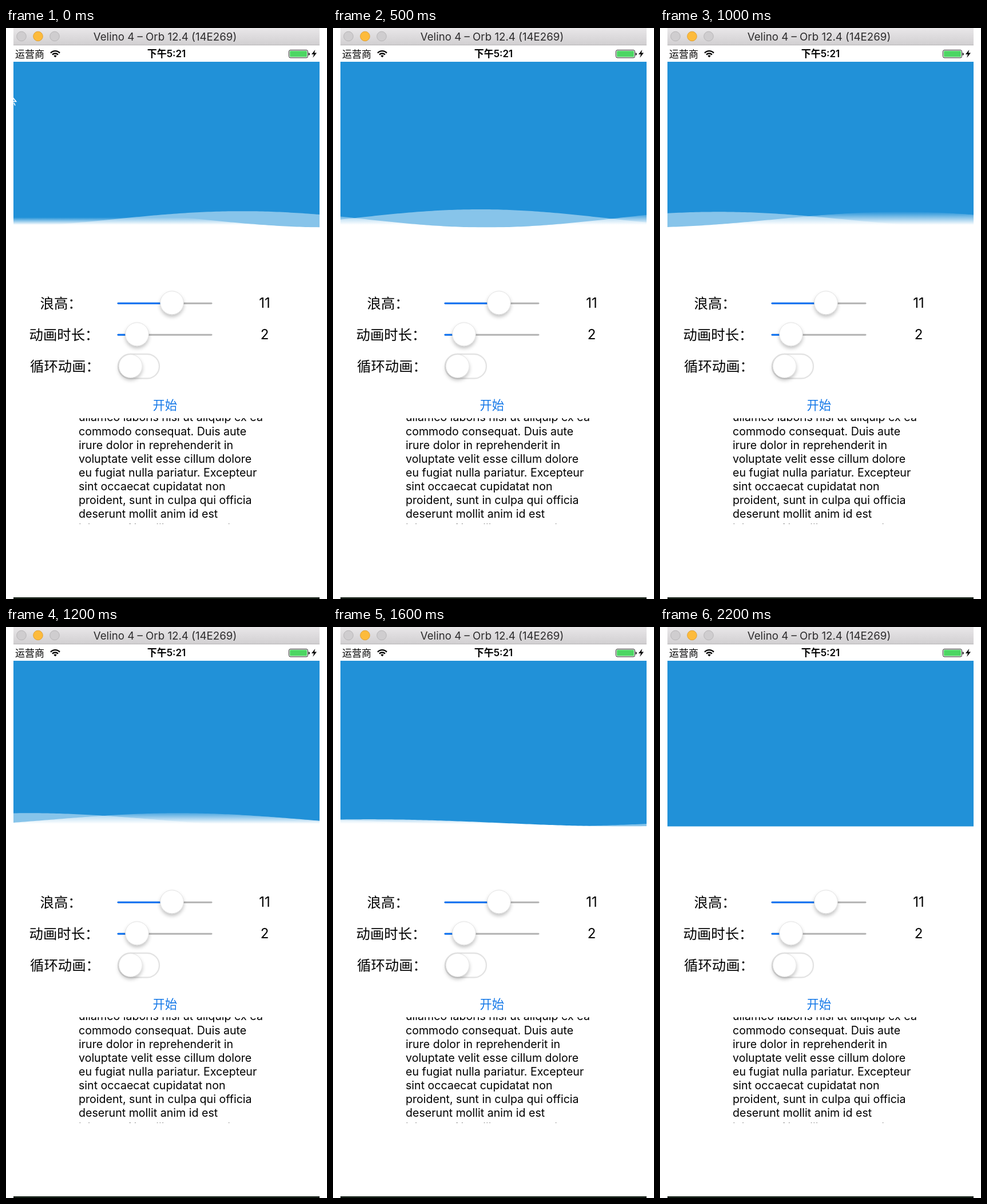
Write an HTML page that moves like this. It is 561 px wide and 998 px high and loops after 2400 ms.

```html
<!DOCTYPE html>
<html lang="zh-CN">
<head>
<meta charset="utf-8">
<title>Wave</title>
<style>
  html, body { margin: 0; width: 100%; height: 100%; overflow: hidden; background: #fff; }
  svg { display: block; width: 561px; height: 998px; }
  text { font-family: Inter, "Noto Sans CJK SC", "Noto Sans CJK", sans-serif; fill: #000; }
  .title { font-size: 18.7px; fill: #2c2b2c; text-anchor: middle; }
  .status { font-size: 17px; }
  .label { font-size: 24.4px; }
  .value { font-size: 24px; text-anchor: middle; }
  .start { font-size: 21.3px; fill: #1478e8; }
  .body { font-size: 19.6px; }
  .thumb { fill: #fff; stroke: #d6d6d6; stroke-width: .7; filter: url(#shadow); }
</style>
</head>
<body>
<svg viewBox="0 0 561 998">
  <defs>
    <linearGradient id="bar" x1="0" y1="0" x2="0" y2="1">
      <stop offset="0" stop-color="#e9e7e9"/>
      <stop offset="1" stop-color="#d1cfd1"/>
    </linearGradient>
    <linearGradient id="foam" gradientUnits="userSpaceOnUse" x1="0" y1="331" x2="0" y2="344">
      <stop offset="0" stop-color="#fff" stop-opacity="0"/>
      <stop offset="1" stop-color="#fff"/>
    </linearGradient>
    <filter id="shadow" x="-40%" y="-40%" width="180%" height="190%">
      <feDropShadow dx="0" dy="4" stdDeviation="3.2" flood-color="#000" flood-opacity=".24"/>
    </filter>
    <clipPath id="textBox"><rect x="120" y="682" width="340" height="184.5"/></clipPath>
    <clipPath id="screen"><rect x="13" y="0" width="535" height="998"/></clipPath>
  </defs>

  <rect x="13" width="535" height="30" fill="url(#bar)"/>
  <rect x="13" y="29.3" width="535" height="1" fill="#b4b2b4"/>
  <g stroke-width="1">
    <circle cx="27" cy="14.5" r="8.3" fill="#cfcdcf" stroke="#b7b5b7"/>
    <circle cx="56" cy="14.5" r="8.3" fill="#fdbb3c" stroke="#dfa033"/>
    <circle cx="85" cy="14.5" r="8.3" fill="#cfcdcf" stroke="#b7b5b7"/>
  </g>
  <text class="title" x="278" y="21.5">Velino 4 – Orb 12.4 (14E269)</text>

  <text class="status" x="16" y="51.5">运营商</text>
  <g transform="translate(86 51)" fill="none" stroke="#000" stroke-width="2.3">
    <path d="M-8 -7.4A11 11 0 0 1 8 -7.4M-5 -4.4A7 7 0 0 1 5 -4.4"/>
    <path d="M-2.7 -2.4A3.7 3.7 0 0 1 2.7 -2.4L0 .6Z" fill="#000" stroke="none"/>
  </g>
  <text class="status" x="280.5" y="51.3" text-anchor="middle" font-weight="600">下午5:21</text>
  <rect x="494.5" y="38.6" width="33" height="13.4" rx="2.5" fill="#fff" stroke="#222"/>
  <rect x="496" y="40" width="30" height="10.6" rx="1.2" fill="#4cd663"/>
  <path d="M528.8 43v5q2-.5 2-2.5t-2-2.5Z"/>
  <path d="M540.3 38L534 46H538L536.3 52L543 43.6H539Z"/>

  <rect x="13" y="59" width="535" height="289.5" fill="#2191d8"/>
  <g clip-path="url(#screen)">
    <path id="back" fill="#fff" fill-opacity=".46"/>
    <path id="front" fill="url(#foam)"/>
    <path id="cursor" d="M12 121.5L17.5 128.5H13M14 131L16 135.5" fill="none" stroke="#fff" stroke-width="1.7"/>
  </g>

  <text class="label" x="59.5" y="490">浪高：</text>
  <text class="label" x="40.5" y="545">动画时长：</text>
  <text class="label" x="42" y="600">循环动画：</text>
  <text class="value" x="452" y="489">11</text>
  <text class="value" x="452" y="543.5">2</text>

  <g id="sliders"></g>
  <rect x="196" y="570" width="72" height="42.5" rx="21.2" fill="#fff" stroke="#e3e3e3" stroke-width="2.3"/>
  <circle class="thumb" cx="217.7" cy="591" r="20.4"/>

  <text class="start" x="256.5" y="666.5">开始</text>
  <g id="copy" clip-path="url(#textBox)"></g>
  <rect x="13" y="995" width="535" height="3" fill="#1a241c"/>
</svg>
<script>
  const LEFT = 13, RIGHT = 548, BOTTOM = 348.5, HALF_WAVE = 449;
  const STEP = 100, LOOP = 2400, LAST = 2200;
  const $ = id => document.getElementById(id);

  const slider = (y, x) => `
    <path d="M196 ${y}H359" stroke="#b3b3b3" stroke-width="2.9" stroke-linecap="round"/>
    <path d="M196 ${y}H${x}" stroke="#0b72f5" stroke-width="2.9" stroke-linecap="round"/>
    <circle class="thumb" cx="${x}" cy="${y - 1}" r="20.4"/>`;
  $('sliders').innerHTML = slider(481.3, 290) + slider(536.3, 229);

  const lines = [
    'ullamco laboris nisi ut aliquip ex ea',
    'commodo consequat. Duis aute',
    'irure dolor in reprehenderit in',
    'voluptate velit esse cillum dolore',
    'eu fugiat nulla pariatur. Excepteur',
    'sint occaecat cupidatat non',
    'proident, sunt in culpa qui officia',
    'deserunt mollit anim id est',
    'laborum. Nam liber te conscient'
  ];
  $('copy').innerHTML = lines.map((s, i) =>
    `<text class="body" x="127" y="${687.4 + i * 24.15}">${s}</text>`).join('');

  // Swells until 500 ms, then sinks to the bottom edge.
  function amplitude(t) {
    const angle = t < 500 ? (500 - t) * 0.0009 : (t - 500) * 0.00106;
    return 15.75 * Math.cos(Math.min(angle, Math.PI / 2));
  }

  // The fade starts low and rises as the waves build up.
  const foamTop = t => 320 + 11 * Math.exp(-t / 350);

  function wave(crest, amp) {
    let d = `M${LEFT} ${BOTTOM + 1}`;
    for (let x = LEFT; x <= RIGHT; x += 5) {
      const y = BOTTOM - amp * (1 + Math.cos((x - crest) * Math.PI / HALF_WAVE));
      d += `L${x} ${y.toFixed(2)}`;
    }
    return d + `V${BOTTOM + 1}Z`;
  }

  function draw() {
    const now = performance.now() % LOOP;
    const t = Math.min(Math.floor(now / STEP) * STEP, LAST);
    const amp = amplitude(t);
    const visible = amp > 0.01 ? 'visible' : 'hidden';
    $('back').setAttribute('d', wave(412 - 0.31 * t, amp));
    $('front').setAttribute('d', wave(565 + HALF_WAVE - 0.594 * t, amp));
    $('foam').setAttribute('y1', foamTop(t));
    $('back').style.visibility = $('front').style.visibility = visible;
    $('cursor').style.visibility = t < STEP ? 'visible' : 'hidden';
    requestAnimationFrame(draw);
  }
  draw();
</script>
</body>
</html>
```
